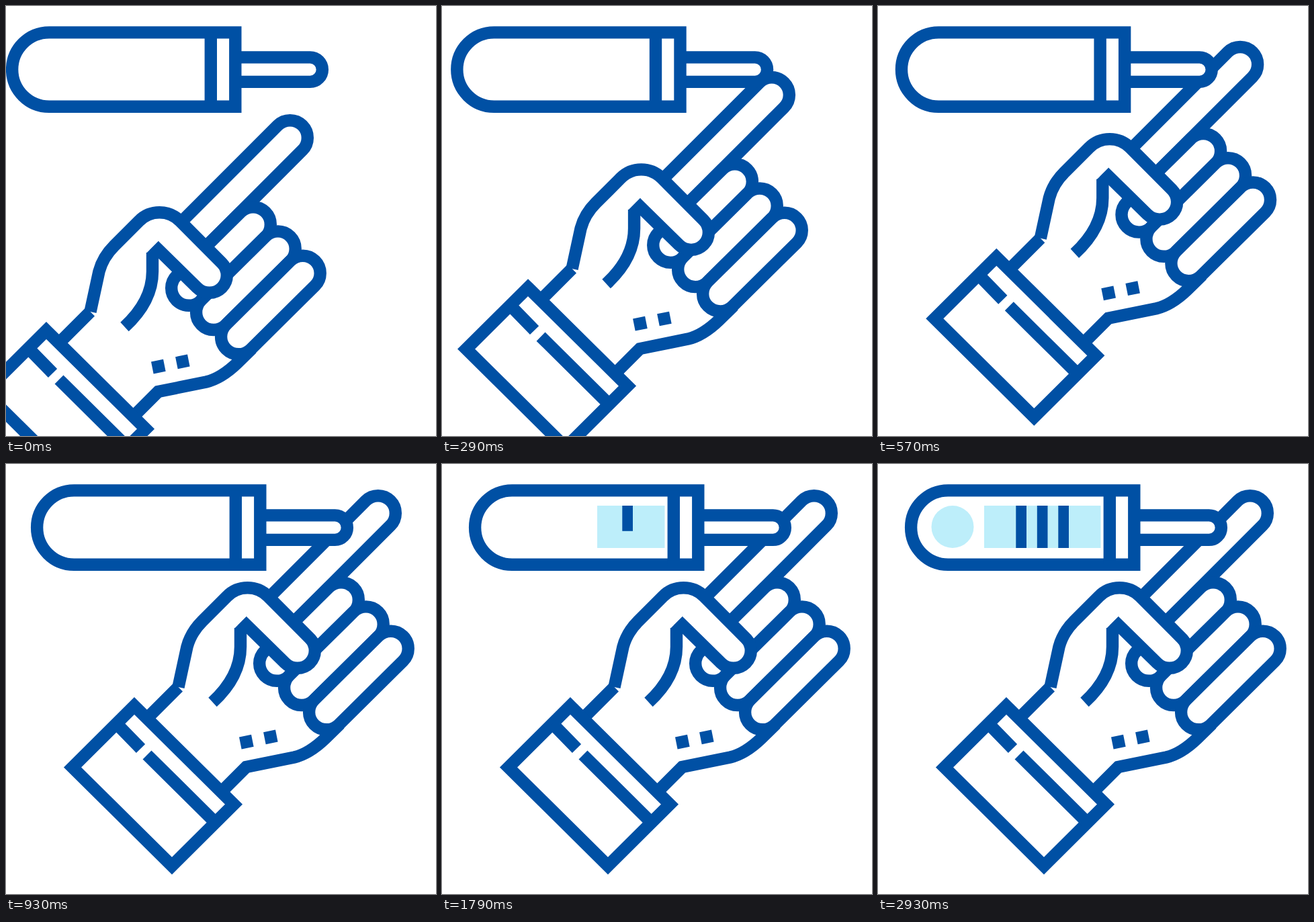
Animation of 640x640 px, one loop 3.57 s. Source, as an HTML page:

```html
<!DOCTYPE html>
<html lang="en">
<head>
<meta charset="utf-8">
<title>Finger test</title>
<style>
  html, body { margin: 0; height: 100%; overflow: hidden; background: #fff; }
  svg { display: block; width: 100%; height: 100%; }
  .line { fill: none; stroke: #0050a4; stroke-width: 18.4; stroke-miterlimit: 10; }
  .solid { fill: #fff; }
  .ink { fill: #0050a4; }
  .tint { fill: #bdeefa; }
</style>
</head>
<body>
<svg viewBox="0 0 640 640">
  <g id="hand" class="line">
    <!-- index finger -->
    <path d="M391.5 198.7L535.4 54.8A26 26 0 0 1 572.2 91.6L428 235.8"/>
    <!-- folded fingers -->
    <g class="solid">
      <path id="finger" d="M480.4 183.8A26 26 0 0 1 517.2 220.6L421.6 315.2A26 26 0 0 1 384.8 278.4Z"/>
      <use href="#finger" x="36.9" y="36.2"/>
      <use href="#finger" x="73.9" y="72.5"/>
    </g>
    <!-- palm and thumb -->
    <path d="M497 387L475 408.500C462 421 448 432 429 436.500L357.500 451L315 493.500"/>
    <path class="solid" d="M256.500 332L269.500 272C273.500 257 281 245 292 234L329 197A43 43 0 0 1 390 197L452.200 259.400A26 26 0 0 1 415.400 296.200L351.500 233.500"/>
    <path d="M256.500 332L209 379.500M349 244V272C349 304 332 332 307.500 354.500"/>
    <path class="ink" stroke="none" style="stroke: none" d="M339.800 245L358.200 226.700V245Z"/>
    <path stroke-dasharray="18.4" d="M348.800 415.400L402.800 404.600"/>
    <!-- cuff -->
    <path class="solid" d="M191 360L339 506.500L247 598L99 451.500Z"/>
    <path d="M164.500 386.500L200.500 423.500M210 433L311.500 533.500"/>
  </g>
  <g id="device" class="line">
    <path class="solid" d="M381.300 76.400H492.600A18.200 18.200 0 0 1 492.600 112.900H381.300"/>
    <path class="solid" d="M381.300 39.400H104.300A55.200 55.200 0 0 0 104.300 149.800H381.300Z"/>
    <path d="M344.800 39.400V149.800"/>
  </g>
  <rect id="panel" class="tint" y="62" height="63"/>
  <g class="ink">
    <rect class="bar" x="268.300" y="62" width="15.700"/>
    <rect class="bar" x="236.800" y="62" width="15.700"/>
    <rect class="bar" x="205.300" y="62" width="15.700"/>
  </g>
  <circle id="spot" class="tint" cx="111" cy="93.500"/>
</svg>
<script>
  const LOOP = 3570, STEP = 71.4;
  const hand = document.getElementById('hand');
  const device = document.getElementById('device');
  const panel = document.getElementById('panel');
  const spot = document.getElementById('spot');
  const bars = document.querySelectorAll('.bar');

  const progress = (n, from, to) => Math.min(1, Math.max(0, (n - from) / (to - from)));
  const move = (part, x, y) => part.setAttribute('transform', `translate(${x} ${y})`);

  function draw(n) {
    const handLeft = 1 - Math.sin(progress(n, 0, 11.5) * Math.PI / 2);
    move(hand, -131 * handLeft, 123 * handLeft);

    // The device enters at speed and eases to rest.
    const sweep = 1.93;
    const deviceLeft = (1 - Math.cos(sweep * (1 - progress(n, 0, 17)))) / (1 - Math.cos(sweep));
    move(device, -40 * deviceLeft, 0);

    const width = 173.5 * progress(n, 14, 33);
    panel.setAttribute('x', 331.5 - width);
    panel.setAttribute('width', width);

    bars.forEach((bar, i) => {
      const start = 22 + 3 * i;
      bar.setAttribute('height', 63 * progress(n, start, start + 5));
    });

    // The spot swells past its size, then snaps back.
    spot.setAttribute('r', n > 40 ? 31.5 : 36 * progress(n, 31, 40));
  }

  function tick() {
    draw(Math.floor(performance.now() % LOOP / STEP + 0.1));
    requestAnimationFrame(tick);
  }
  tick();
</script>
</body>
</html>
```
